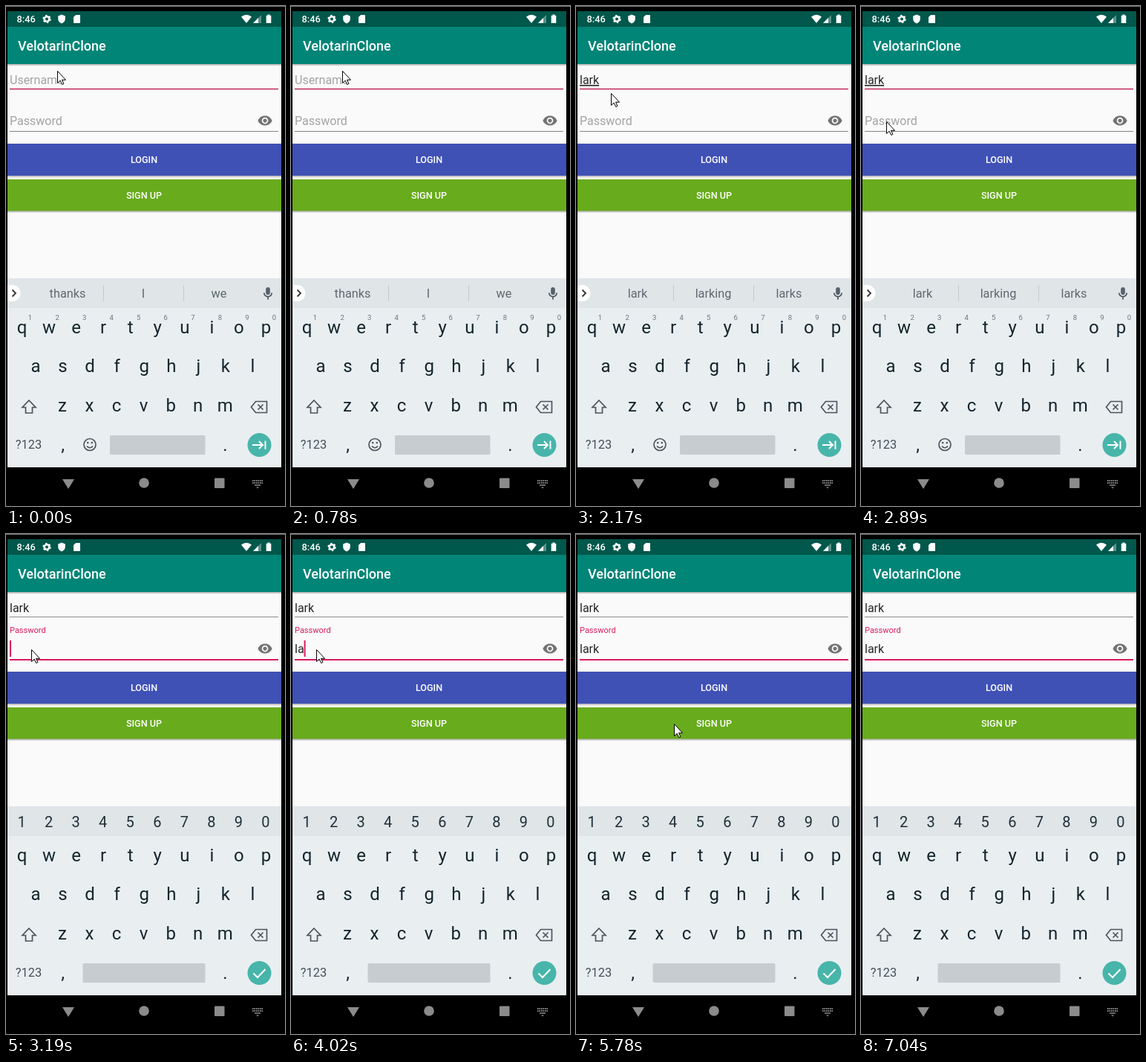
Recreate the animation shown at these times as an HTML page. Size 376 by 672 pixels, loop 8 s.

```html
<!DOCTYPE html>
<html lang="en">
<head>
<meta charset="utf-8">
<title>Login form</title>
<style>
  html, body { margin: 0; width: 100%; height: 100%; overflow: hidden; background: #000; }
  svg { display: block; width: 376px; height: 672px; font-family: Roboto, sans-serif; }
  text { white-space: pre; }
  .mid { text-anchor: middle; }
  .medium { font-weight: 500; fill: #fff; }
  .field { font-size: 16px; fill: #262626; }
  .hint { font-size: 16px; fill: #a3a3a3; }
  .composing { text-decoration: underline; text-decoration-skip-ink: none; }
  .key { font-size: 24px; fill: #14252c; }
  .digit { font-size: 20px; fill: #1f3037; }
  .sup { font-size: 9.5px; fill: #6b777d; }
  .word { font-size: 16.3px; fill: #5d696f; }
  .line { fill: none; stroke: #4a565c; stroke-width: 1.7; }
  .white { fill: none; stroke: #fff; stroke-width: 2; }
</style>
</head>
<body>
<svg viewBox="0 0 376 672">
  <defs>
    <linearGradient id="shade" x2="0" y2="1">
      <stop stop-color="#000" stop-opacity=".32"/>
      <stop offset="1" stop-color="#000" stop-opacity="0"/>
    </linearGradient>
  </defs>
  <rect width="376" height="672"/>
  <rect width="376" height="1" fill="#777"/>

  <!-- status bar -->
  <rect x="2" y="7" width="369" height="21" fill="#00574b"/>
  <text class="medium" x="14.5" y="22" font-size="12.8">8:46</text>
  <g fill="#fff">
    <circle cx="55" cy="17.5" r="3.3" fill="none" stroke="#fff" stroke-width="2.6"/>
    <circle cx="55" cy="17.5" r="4.9" fill="none" stroke="#fff" stroke-width="1.6" stroke-dasharray="2.4 2.73"/>
    <path d="M75 11.5l4.8 2v4c0 2.8-2 5-4.8 6-2.8-1-4.8-3.2-4.8-6v-4z"/>
    <path d="M94 12h5.2q.8 0 .8.8v9.4q0 .8-.8.8h-7.4q-.8 0-.8-.8V15z"/>
    <path d="M324 23l-7-8.6q7-5.400 14 0z"/>
    <path d="M344 12v11h-11z" opacity=".35"/>
    <path d="M340 16v7h-7z"/>
    <path d="M352.500 11.500h3v1.200h1.800V23h-6.600V12.700h1.800z"/>
  </g>

  <!-- app bar and form -->
  <rect x="2" y="78" width="369" height="288" fill="#fafafa"/>
  <rect x="2" y="28" width="369" height="50" fill="#008577"/>
  <rect x="2" y="78" width="369" height="3" fill="url(#shade)"/>
  <text class="medium" x="16" y="60" font-size="18">VelotarinClone</text>
  <text class="hint" id="userHint" x="5" y="105">Username</text>
  <text class="field" id="user" x="5" y="105"></text>
  <rect id="userLine" x="5" width="362"/>
  <text class="hint" id="passHint" x="5">Password</text>
  <text class="field" id="pass" x="5" y="160"></text>
  <rect id="passLine" x="5" width="362"/>
  <rect id="caret" width="2" height="22" fill="#d81b60"/>
  <path transform="translate(338.600 143.600) scale(.87)" fill="#737373" d="M12 4.500C7 4.500 2.730 7.610 1 12c1.730 4.390 6 7.500 11 7.500s9.270-3.110 11-7.500c-1.730-4.390-6-7.500-11-7.500zM12 17c-2.760 0-5-2.240-5-5s2.240-5 5-5 5 2.240 5 5-2.240 5-5 5zm0-8c-1.660 0-3 1.340-3 3s1.340 3 3 3 3-1.340 3-3-1.340-3-3-3z"/>
  <rect x="2" y="185" width="369" height="43" fill="#3f51b5"/>
  <rect x="2" y="228" width="369" height="3" fill="url(#shade)"/>
  <text class="medium mid" x="186" y="211" font-size="12.6">LOGIN</text>
  <rect x="2" y="233" width="369" height="42.500" fill="#68ab1c"/>
  <rect x="2" y="275.500" width="369" height="3" fill="url(#shade)"/>
  <text class="medium mid" x="186" y="259" font-size="12.6">SIGN UP</text>

  <!-- keyboard -->
  <rect x="2" y="366" width="369" height="254" fill="#e9eef1"/>
  <rect x="2" y="366" width="369" height="40" fill="#e0e5e8"/>
  <g id="keys"></g>
  <path class="line" d="M31 530l9 9.500h-4.500v7.500h-9v-7.500H22z"/>
  <path class="line" d="M336.500 531.500h15v15h-15l-6-7.500zM339.500 535.500l7 7m0-7l-7 7"/>
  <text class="mid" x="30.500" y="595" font-size="16.4" fill="#435058">?123</text>
  <text class="key mid" x="76.500" y="598">,</text>
  <text class="key mid" x="295.500" y="598">.</text>
  <rect id="space" y="577" height="26" rx="2" fill="#c7ccd0"/>
  <circle cx="341.500" cy="590" r="16" fill="#48b5aa"/>
  <g id="wordMode">
    <path d="M2 375h6.500a11 11 0 0 1 0 22H2z" fill="#fff"/>
    <path d="M8.500 381.500l4.500 4.500-4.500 4.500" fill="none" stroke="#333" stroke-width="1.800"/>
    <path d="M131.500 375.500v21M239.500 375.500v21" stroke="#c3c9cc"/>
    <rect x="350.200" y="378" width="5.600" height="10" rx="2.800" fill="#566269"/>
    <path class="line" stroke-width="1.500" d="M347.800 385.500a5.200 5.200 0 0 0 10.400 0M353 391v3.500"/>
    <circle class="line" cx="113" cy="589.500" r="8"/>
    <path class="line" d="M109 591.500q4 4.500 8 0"/>
    <circle cx="110.200" cy="587" r="1.300" fill="#4a565c"/>
    <circle cx="115.800" cy="587" r="1.300" fill="#4a565c"/>
    <path class="white" d="M332 590h14m-5-5l5 5-5 5M349.500 584.500v11"/>
  </g>
  <path id="check" class="white" d="M333.500 590.500l5.500 5.500 10.500-11"/>

  <!-- navigation bar -->
  <g fill="#8b8b8b">
    <path d="M76 636h16l-8 13z"/>
    <circle cx="186" cy="641" r="6.800"/>
    <rect x="281" y="634.500" width="13.500" height="13.500" rx="1"/>
    <path d="M332 638h14M332 641h14" stroke="#8b8b8b" stroke-width="1.800" stroke-dasharray="1.600 .9"/>
    <path d="M335 643.300h8v1.500h-8zM337 646.500h4l-2 2z"/>
  </g>
  <path id="mouse" fill="#fff" stroke="#000" d="M.5 .5V16.500L4.200 13.200 6.700 18.500 8.900 17.500 6.500 12.300H11.500Z"/>
</svg>
<script>
const $ = id => document.getElementById(id);
const PITCH = 36.55, PINK = '#d81b60';

function add(parent, cls, x, y, label = '') {
  const node = document.createElementNS('http://www.w3.org/2000/svg', 'text');
  node.setAttribute('class', cls);
  node.setAttribute('x', x);
  node.setAttribute('y', y);
  node.textContent = label;
  return parent.appendChild(node);
}
function set(id, attrs) {
  for (const name in attrs) $(id).setAttribute(name, attrs[name]);
}
function show(id, on) {
  $(id).style.display = on ? '' : 'none';
}

[['qwertyuiop', 21.5, 440], ['asdfghjkl', 40, 492], ['zxcvbnm', 76, 545]].forEach(([row, x, y]) =>
  [...row].forEach((c, i) => add($('keys'), 'key mid', x + i * PITCH, y, c)));
const digits = [...'1234567890'].map((c, i) => {
  add($('wordMode'), 'sup mid', 32.5 + i * PITCH, 422, c);
  return add($('keys'), 'digit mid', 21 + i * PITCH, 394, c);
});
const words = [83, 185, 287].map(x => add($('wordMode'), 'word mid', x, 392));

// Each step: start time and what changes then. focus: 0 user, 1 switching, 2 password
const steps = [
  [0, { user: '', pass: '', caret: false, focus: 0, mouse: [69, 87], words: ['thanks', 'I', 'we'] }],
  [250, { caret: true }],
  [780, { caret: false }],
  [930, { user: 'l', caret: true }],
  [1060, { words: ['l', 'the', 'looks'] }],
  [1180, { user: 'la', words: ['la', 'the', 'lark'] }],
  [1330, { user: 'lar', words: ['lar', 'large', 'lark'] }],
  [1450, { user: 'lark', words: ['lark', 'larking', 'larks'] }],
  [1880, { caret: false }],
  [2170, { mouse: [47, 117] }],
  [2310, { mouse: [34, 153] }],
  [2460, { mouse: [34, 155], caret: true }],
  [2890, { caret: false }],
  [3040, { focus: 1 }],
  [3190, { focus: 2, caret: true }],
  [3590, { caret: false }],
  [3740, { pass: 'l', caret: true }],
  [4020, { pass: 'la' }],
  [4140, { pass: 'lar' }],
  [4410, { pass: 'lark' }],
  [4780, { caret: false }],
  [4930, { mouse: [39, 162] }],
  [5080, { mouse: [95, 202] }],
  [5230, { mouse: [127, 233] }],
  [5380, { mouse: [131, 249], caret: true }],
  [5510, { mouse: [132, 254] }],
  [5660, { mouse: [132, 255] }],
  [5780, { caret: false }],
  [6450, { caret: true }],
  [6890, { mouse: null }],
  [7040, { caret: false }]
];

function draw(t) {
  const s = Object.assign({}, ...steps.filter(([at]) => at <= t).map(([, change]) => change));
  const onPass = s.focus > 0, digitMode = s.focus === 2;

  $('user').textContent = s.user;
  $('pass').textContent = s.pass;
  $('user').classList.toggle('composing', !onPass);
  show('userHint', !s.user);
  set('userLine', onPass ? { y: 111, height: 1, fill: '#8c8c8c' } : { y: 110.8, height: 1.5, fill: '#c02a5c' });
  set('passLine', onPass ? { y: 168, height: 2, fill: PINK } : { y: 168, height: 1, fill: '#858585' });
  const [y, size, color] = [[159.5, 16, '#a3a3a3'], [148, 14, '#c46a8b'], [133, 11, PINK]][s.focus];
  set('passHint', { y, style: `font-size:${size}px;fill:${color}` });

  show('caret', s.caret);
  set('caret', {
    x: 5 + $(onPass ? 'pass' : 'user').getComputedTextLength(),
    y: onPass ? 143 : 87
  });

  show('wordMode', !digitMode);
  show('check', digitMode);
  digits.forEach(d => d.style.display = digitMode ? '' : 'none');
  words.forEach((w, i) => w.textContent = s.words[i]);
  set('space', digitMode ? { x: 103.5, width: 165 } : { x: 140, width: 128.5 });

  show('mouse', s.mouse);
  if (s.mouse) set('mouse', { transform: `translate(${s.mouse})` });
}

const start = performance.now();
function tick() {
  draw((performance.now() - start) % 8000);
  requestAnimationFrame(tick);
}
tick();
</script>
</body>
</html>
```
